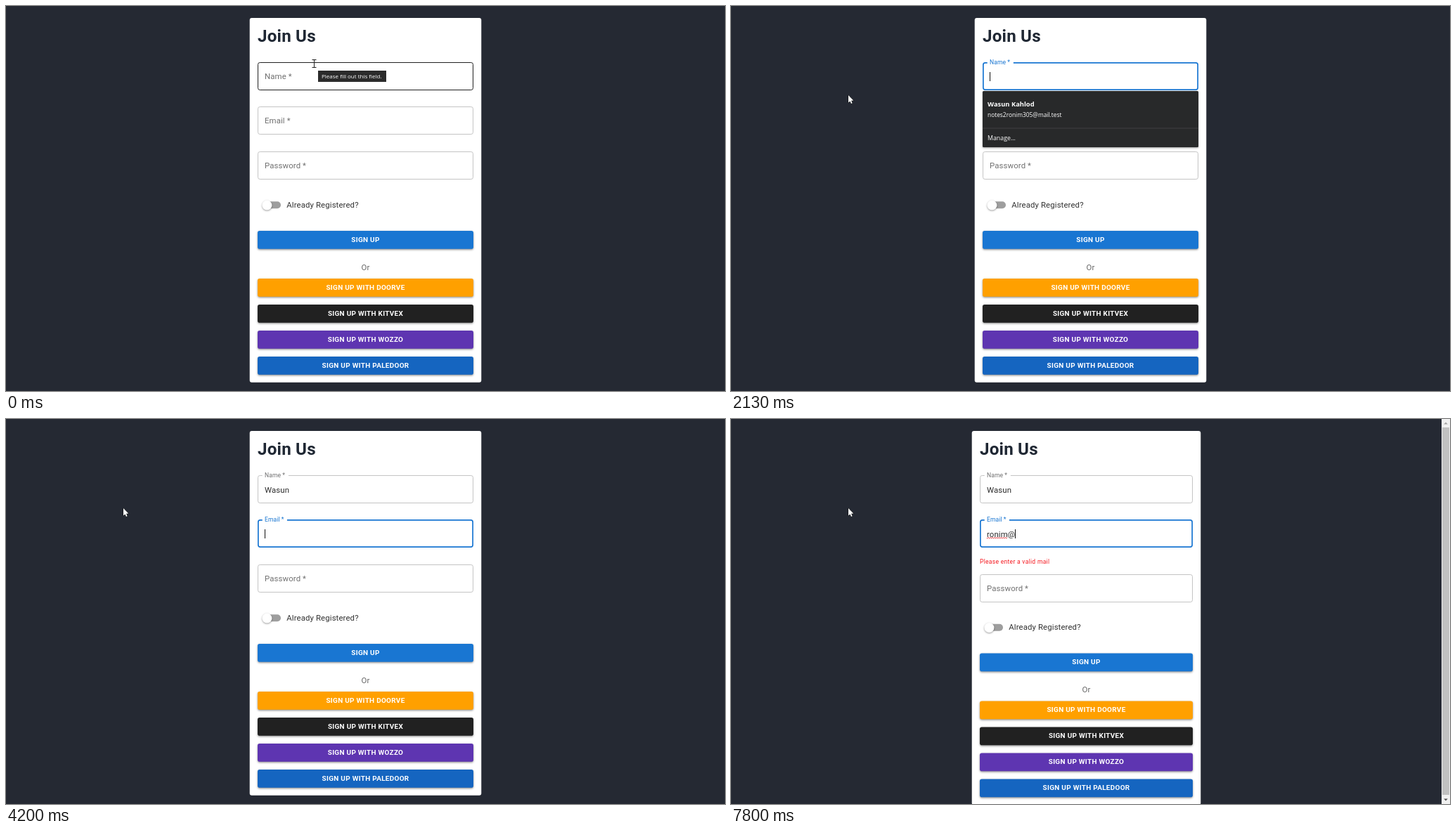
Recreate the animation shown at these times as an HTML page with a canvas. Size 1023 px wide and 548 px high, loop 8 s.

```html
<!DOCTYPE html>
<html lang="en">
<head>
<meta charset="utf-8">
<title>Join Us</title>
<style>
  html, body { margin: 0; width: 100%; height: 100%; overflow: hidden; background: #252933; }
  canvas { display: block; }
</style>
</head>
<body>
<canvas id="stage" width="1023" height="548"></canvas>
<script>
const ctx = document.getElementById('stage').getContext('2d');
const LOOP = 8000;
const BLUE = [25, 118, 210], GREY = [112, 112, 112];
const BODY = 11.4, SMALL = 8.55;

const NAME = 'Wasun', MAIL = 'ronim@';
const NAME_KEYS = [2670, 3000, 3330, 3470, 3600];
const MAIL_KEYS = [5800, 5930, 5930, 6130, 6270, 7800];
const NAME_FOCUS = 1130, MAIL_FOCUS = 4070, ERROR_AT = 5800, SPELL_AT = 7270;

const BUTTONS = [
  [320, '#1976d2', 'SIGN UP'],
  [388, '#ffa000', 'SIGN UP WITH DOORVE'],
  [425, '#212121', 'SIGN UP WITH KITVEX'],
  [462, '#5e35b1', 'SIGN UP WITH WOZZO'],
  [499, '#1565c0', 'SIGN UP WITH PALEDOOR'],
];

const progress = (now, start, length) => Math.min(1, Math.max(0, (now - start) / length));
const easeOut = p => 1 - (1 - p) ** 3;
const easeBoth = p => p * p * (3 - 2 * p);
const lerp = (a, b, p) => a + (b - a) * p;
const mix = (a, b, p) => `rgb(${a.map((v, i) => Math.round(lerp(v, b[i], p)))})`;

function text(str, x, y, size, color, { weight = 400, family = 'Roboto', spacing = 0.00938, align = 'left' } = {}) {
  ctx.font = `${weight} ${size}px ${family}, sans-serif`;
  ctx.letterSpacing = `${spacing * size}px`;
  ctx.textAlign = align;
  ctx.fillStyle = color;
  ctx.fillText(str, x, y);
  return ctx.measureText(str).width;
}

function box(x, y, w, h, r, color) {
  ctx.beginPath();
  ctx.roundRect(x, y, w, h, r);
  ctx.fillStyle = color;
  ctx.fill();
}

function withShadow(color, blur, dy, draw) {
  ctx.save();
  ctx.shadowColor = color;
  ctx.shadowBlur = blur;
  ctx.shadowOffsetY = dy;
  draw();
  ctx.restore();
}

function field(form, y, label, { float = 0, tint = 0, focused, hover, value = '', caret, misspelled } = {}) {
  const { x, w } = form, left = x + 10;
  const line = focused ? 1.7 : 1;
  ctx.beginPath();
  ctx.roundRect(x + line / 2, y + line / 2, w - line, 40 - line, 2.8);
  ctx.lineWidth = line;
  ctx.strokeStyle = focused ? mix(BLUE, BLUE, 0) : hover ? '#212121' : '#c4c4c4';
  ctx.stroke();

  const size = lerp(BODY, SMALL, float);
  if (float > 0) {
    ctx.font = `400 ${SMALL}px Roboto, sans-serif`;
    const gap = (ctx.measureText(label).width + 7.5) * Math.min(1, float * 1.5);
    ctx.fillStyle = '#fff';
    ctx.fillRect(x + 6.7, y - 1, gap, 3);
  }
  text(label, left, lerp(y + 24, y + 3, float), size, mix(GREY, BLUE, tint));

  const width = value ? text(value, left, y + 24.6, BODY, '#2b2b2b') : 0;
  if (caret) {
    ctx.fillStyle = '#111';
    ctx.fillRect(Math.round(left + width), y + 14, 1, 13);
  }
  if (misspelled) {
    ctx.beginPath();
    for (let dx = 0; dx <= 29; dx += 0.5) ctx.lineTo(left + dx, y + 26.3 + 0.9 * Math.sin(dx * Math.PI / 1.5));
    ctx.lineWidth = 0.8;
    ctx.strokeStyle = '#e5252a';
    ctx.stroke();
  }
}

function toggle(x, y) {
  box(x + 9, y - 5, 24, 10, 5, '#9e9e9e');
  withShadow('rgba(0,0,0,.4)', 2.5, 1, () => box(x + 6.4, y - 6.7, 14, 14, 7, '#fff'));
  text('Already Registered?', x + 41.3, y + 3.2, BODY, '#333');
}

function suggestions(alpha, scale) {
  const sans = { family: '"Open Sans"', spacing: 0 };
  ctx.save();
  ctx.globalAlpha = alpha;
  ctx.translate(511.5, 161);
  ctx.scale(scale, scale);
  ctx.translate(-511.5, -161);
  withShadow('rgba(0,0,0,.4)', 3, 1, () => box(358, 121, 307, 80, 1.5, '#28292a'));
  ctx.fillStyle = '#404142';
  ctx.fillRect(358, 173.5, 307, 1);
  text('Wasun Kahlod', 365, 143, 9.4, '#fff', { ...sans, weight: 700 });
  text('notes2ronim305@mail.test', 365, 158, 8.4, '#fff', sans);
  text('Manage...', 365, 191, 8.8, '#fff', sans);
  ctx.restore();
}

function tooltip() {
  box(444, 92, 97, 16, 0, '#2b2b2b');
  text('Please fill out this field.', 449, 103, 8, '#fff', { family: '"Open Sans"', spacing: 0 });
}

function beam(x, y) {
  ctx.beginPath();
  for (const end of [-5.5, 5.5]) {
    ctx.moveTo(x - 3, y + end);
    ctx.lineTo(x + 3, y + end);
  }
  ctx.moveTo(x, y - 5.5);
  ctx.lineTo(x, y + 5.5);
  ctx.lineWidth = 1;
  ctx.strokeStyle = '#222';
  ctx.stroke();
}

function arrow(x, y) {
  ctx.beginPath();
  for (const [dx, dy] of [[0, 0], [0, 10.5], [2.4, 8.4], [4, 12], [5.6, 11.3], [4.1, 7.8], [7.3, 7.6]]) ctx.lineTo(x + dx, y + dy);
  ctx.closePath();
  ctx.lineWidth = 1;
  ctx.strokeStyle = '#111';
  ctx.stroke();
  ctx.fillStyle = '#fff';
  ctx.fill();
}

function pointer(now) {
  const drop = easeBoth(progress(now, 470, 400));
  const away = easeBoth(progress(now, 1200, 270));
  if (away === 0) beam(lerp(438.5, 442.5, drop), lerp(82, 107, drop));
  else arrow(lerp(442.5, 167, away), lerp(107, 127, away));
}

function scrollbar() {
  ctx.fillStyle = '#f1f1f1';
  ctx.fillRect(1011, 0, 12, 548);
  ctx.fillStyle = '#c1c1c1';
  ctx.fillRect(1012, 12, 10, 523);
  for (const [y, dir, color] of [[6, 1, '#a3a3a3'], [542, -1, '#505050']]) {
    ctx.beginPath();
    ctx.moveTo(1014.2, y + 1.5 * dir);
    ctx.lineTo(1017, y - 1.5 * dir);
    ctx.lineTo(1019.8, y + 1.5 * dir);
    ctx.fillStyle = color;
    ctx.fill();
  }
}

// The caret restarts its blink at focus and at every key press.
function caretOn(now, focus, keys) {
  const last = Math.max(focus, ...keys.filter(k => k <= now));
  return (now - last) % 1060 < 530;
}

function draw(now) {
  const failed = now >= ERROR_AT;
  const form = failed ? { x: 354, w: 303, mid: 505.5 } : { x: 358, w: 307, mid: 511.5 };
  const shift = failed ? 13.5 : 0;
  const inName = now >= NAME_FOCUS && now < MAIL_FOCUS, inMail = now >= MAIL_FOCUS;
  const typed = (str, keys) => str.slice(0, keys.filter(k => k <= now).length);
  const nameFloat = easeOut(progress(now, 1100, 200));
  const mailFloat = easeOut(progress(now, 4035, 200));

  ctx.fillStyle = '#252933';
  ctx.fillRect(0, 0, 1023, 548);
  box(form.x - 11.3, 17, form.w + 22.6, 518.7 + shift, 3, '#fff');
  text('Join Us', form.x, 51, 24.2, '#1f2733', { weight: 700, spacing: 0.00735 });

  field(form, 80, 'Name *', {
    float: nameFloat, tint: nameFloat - mailFloat, focused: inName, hover: now < NAME_FOCUS,
    value: typed(NAME, NAME_KEYS), caret: inName && caretOn(now, 1070, NAME_KEYS),
  });
  field(form, 143, 'Email *', {
    float: mailFloat, tint: mailFloat, focused: inMail, misspelled: now >= SPELL_AT,
    value: typed(MAIL, MAIL_KEYS), caret: inMail && caretOn(now, MAIL_FOCUS, MAIL_KEYS),
  });
  if (failed) text('Please enter a valid mail', form.x, 205.5, SMALL, '#f51b22', { spacing: 0.0333 });
  field(form, Math.floor(207.5 + shift), 'Password *');
  toggle(form.x, 283.3 + shift);

  for (const [y, color, label] of BUTTONS) {
    withShadow('rgba(0,0,0,.45)', 3, 1.2, () => box(form.x, y + shift, form.w, 25.7, 2.8, color));
    text(label, form.mid, y + shift + 15.7, 9.975, '#fff', { weight: 600, spacing: 0.02857, align: 'center' });
  }
  text('Or', form.mid, 375.8 + shift, BODY, '#666', { align: 'center' });

  const shown = progress(now, 1150, 100) - progress(now, 4035, 100);
  if (shown > 0) suggestions(shown, lerp(0.95, 1, shown));
  if (now < 1070) tooltip();
  if (failed) scrollbar();
  pointer(now);
}

function frame() {
  const tick = Math.floor((performance.now() % LOOP + 4) * 3 / 200);
  draw(Math.round(tick * 20 / 3) * 10 % LOOP);
  requestAnimationFrame(frame);
}
frame();
</script>
</body>
</html>
```
